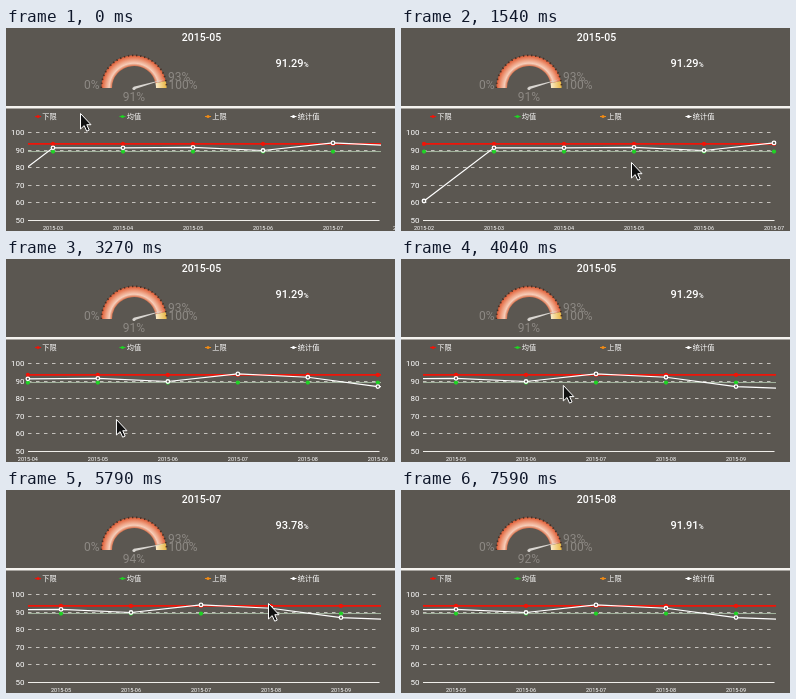
An HTML page for the animation above (7840 ms loop, 389x203 px).

```html
<!DOCTYPE html>
<html lang="zh">
<head>
<meta charset="utf-8">
<style>
html, body { margin: 0; width: 389px; height: 203px; overflow: hidden; background: #5b5751; }
svg { display: block; font-family: Roboto, "Noto Sans CJK SC", "Noto Sans CJK", sans-serif; fill: #fff; }
.dim { fill: #8d8984; font-size: 12px; }
.mid { text-anchor: middle; }
.bold { font-weight: 500; }
</style>
</head>
<body>
<svg width="389" height="203" viewBox="0 0 389 203">
  <defs>
    <radialGradient id="heat" gradientUnits="userSpaceOnUse" cx="128" cy="60" r="33">
      <stop offset=".67" stop-color="#d9744f"/>
      <stop offset=".75" stop-color="#f6cdb9"/>
      <stop offset=".85" stop-color="#ee9f80"/>
      <stop offset="1" stop-color="#dd552d"/>
    </radialGradient>
    <radialGradient id="gold" gradientUnits="userSpaceOnUse" cx="128" cy="60" r="33">
      <stop offset=".67" stop-color="#fbeccb"/>
      <stop offset="1" stop-color="#e9b43c"/>
    </radialGradient>
    <clipPath id="plot"><path d="M22 84H375V203H22Z"/></clipPath>
  </defs>
  <text id="title" class="mid bold" x="195.5" y="13" font-size="10.5"></text>
  <text class="bold" x="269.5" y="39" font-size="11"><tspan id="value"></tspan><tspan font-size="7">%</tspan></text>
  <g id="gauge"></g>
  <text class="dim" x="78" y="61">0%</text>
  <text class="dim" x="162" y="53">93%</text>
  <text class="dim" x="162.5" y="61">100%</text>
  <path id="needle" fill="#d9d6d1"/>
  <circle cx="128" cy="60.5" r="1.6" fill="#d9d6d1"/>
  <text id="percent" class="dim mid" x="128" y="73"></text>
  <path d="M0 78H389V80.5H0Z" fill="#f5f3ef"/>
  <g id="frame"></g>
  <g id="chart"></g>
  <g id="tip"></g>
  <path id="cursor" d="M.5 .5V16L4.2 12.6 6.7 18.2 9.2 17.1 6.8 11.7H11Z" fill="#111" stroke="#fff"/>
</svg>
<script>
const LOOP = 7840, STEP = 70;
const BACK = '#5b5751', RED = '#f01408', GREEN = '#1fd324', ORANGE = '#f08a14';
const LOWER = 93.2, MEAN = 88.9;
const FIRST_MONTH = 2;
const stats = [60.8, 91, 91, 91.29, 89.5, 93.78, 91.91, 86.6, 85];
// time, then value(s)
const scroll = [[1130, 47], [1250, 52], [1540, 93], [2740, 93], [2860, 75], [3270, -48], [3510, -85]];
const pointer = [
  [420, 74, 85], [710, 113, 128], [1130, 113, 128], [1250, 146, 128], [1540, 230, 134],
  [2080, 230, 134], [2440, 300, 128], [2740, 300, 128], [3270, 110, 160], [3510, 99, 164],
  [3680, 99, 164], [4220, 193, 107], [4900, 193, 107], [5160, 243, 117], [5390, 252, 117],
  [5790, 262, 113], [6800, 262, 113], [7300, 355, 200]
];

const $ = id => document.getElementById(id);
const yOf = v => 192 - (v - 50) * 1.76;
const monthName = m => '2015-' + String(m).padStart(2, '0');
const dot = (x, y, color, r = 2.1) => `<circle cx="${x}" cy="${y}" r="${r}" fill="${color}"/>`;
const line = (d, color, width = 1, extra = '') =>
  `<path d="${d}" fill="none" stroke="${color}" stroke-width="${width}" ${extra}/>`;

function track(keys, t, i = 1) {
  if (t <= keys[0][0]) return keys[0][i];
  for (let k = 1; k < keys.length; k++) {
    const a = keys[k - 1], b = keys[k];
    if (t < b[0]) return a[i] + (b[i] - a[i]) * (t - a[0]) / (b[0] - a[0]);
  }
  return keys[keys.length - 1][i];
}

function polar(v, r) {
  const a = Math.PI * (1 - v / 100);
  return [128 + r * Math.cos(a), 60 - r * Math.sin(a)];
}
const arc = (from, to, r) => `M${polar(from, r)}A${r} ${r} 0 0 1 ${polar(to, r)}`;

function drawStatic() {
  $('gauge').innerHTML =
    line(arc(0, 93, 27.3), 'url(#heat)', 10.6) +
    line(arc(93, 100, 27.3), 'url(#gold)', 10.6) +
    line(arc(0, 100, 32.7), '#4a2f24', 1.8, 'stroke-dasharray="1.4 2.7"');

  let html = '';
  for (let v = 50; v <= 100; v += 10) {
    const y = yOf(v);
    html += `<text x="18.5" y="${y + 3}" font-size="8" text-anchor="end">${v}</text>` +
      (v > 50
        ? line(`M22 ${Math.round(y) + .5}H373.5`, '#c4c1bc', 1, 'stroke-dasharray="3.5 4.5"')
        : line(`M22 ${y + .5}H373.5`, '#f0eeea'));
  }
  [['下限', RED, 32], ['均值', GREEN, 116.5], ['上限', ORANGE, 202], ['统计值', '#fff', 287.5]]
    .forEach(([name, color, x]) => {
      html += line(`M${x - 3} 88.5h6`, color) + dot(x, 88.5, color, 1.6) +
        `<text class="bold" x="${x + 4.3}" y="91.3" font-size="7.2">${name}</text>`;
    });
  $('frame').innerHTML = html;
}

function drawChart(march) {
  const points = stats.map((v, i) => [march + (i - 1) * STEP, yOf(v)]);
  const left = Math.max(22, points[0][0]);
  let html = '<g clip-path="url(#plot)">' +
    line(`M${left} ${yOf(MEAN)}H375`, '#a3b49d') +
    line(`M${left} ${yOf(LOWER)}H375`, RED, 1.8) +
    line('M' + points.join('L'), '#fff', 1.2) + '</g>';
  points.forEach(([x, y], i) => {
    html += `<text class="mid" x="${x}" y="201.5" font-size="5.5">${monthName(i + FIRST_MONTH)}</text>`;
    if (x < 21 || x > 375) return;
    html += dot(x, yOf(LOWER), RED) + dot(x, yOf(MEAN), GREEN) +
      dot(x, y, '#fff', 2.4) + dot(x, y, BACK, 1.1);
  });
  $('chart').innerHTML = html;
}

function drawTip(month, march) {
  const v = stats[month - FIRST_MONTH], x = march + (month - 3) * STEP, y = yOf(v);
  $('tip').innerHTML =
    `<rect x="${x - 25.5}" y="${y - 15}" width="51" height="11.7" rx="4" fill="#f2cd1c"/>` +
    `<text class="mid" x="${x}" y="${y - 6.8}" font-size="6.4">${monthName(month)}:${v}</text>`;
}

// The needle kicks past its goal, then settles.
function needleValue(t) {
  const swing = (start, from, to) => {
    const p = Math.min(1, (t - start) / 500);
    return from + (to - from) * p + 10.3 * Math.sin(Math.PI * p);
  };
  return t >= 6560 ? swing(6560, 93.78, 91.91) : t >= 4630 ? swing(4630, 91.29, 93.78) : 91.29;
}

function draw(now) {
  const t = now % LOOP;
  const march = track(scroll, t);
  const month = t >= 6560 ? 8 : t >= 4630 ? 7 : 5;
  $('title').textContent = monthName(month);
  $('value').textContent = stats[month - FIRST_MONTH];

  const v = needleValue(t);
  $('percent').textContent = Math.round(v) + '%';
  $('needle').setAttribute('d', `M${polar(v + 50, 1.3)}L${polar(v, 32)}L${polar(v - 50, 1.3)}Z`);

  drawChart(march);
  if (t >= 4630 && t < 5450 || t >= 6560 && t < 7590) drawTip(month, march);
  else $('tip').innerHTML = '';

  $('cursor').setAttribute('transform', `translate(${track(pointer, t)} ${track(pointer, t, 2)})`);
  $('cursor').style.display = t < 7350 ? '' : 'none';
}

drawStatic();
const start = performance.now();
(function tick() {
  draw(performance.now() - start);
  requestAnimationFrame(tick);
})();
</script>
</body>
</html>
```
